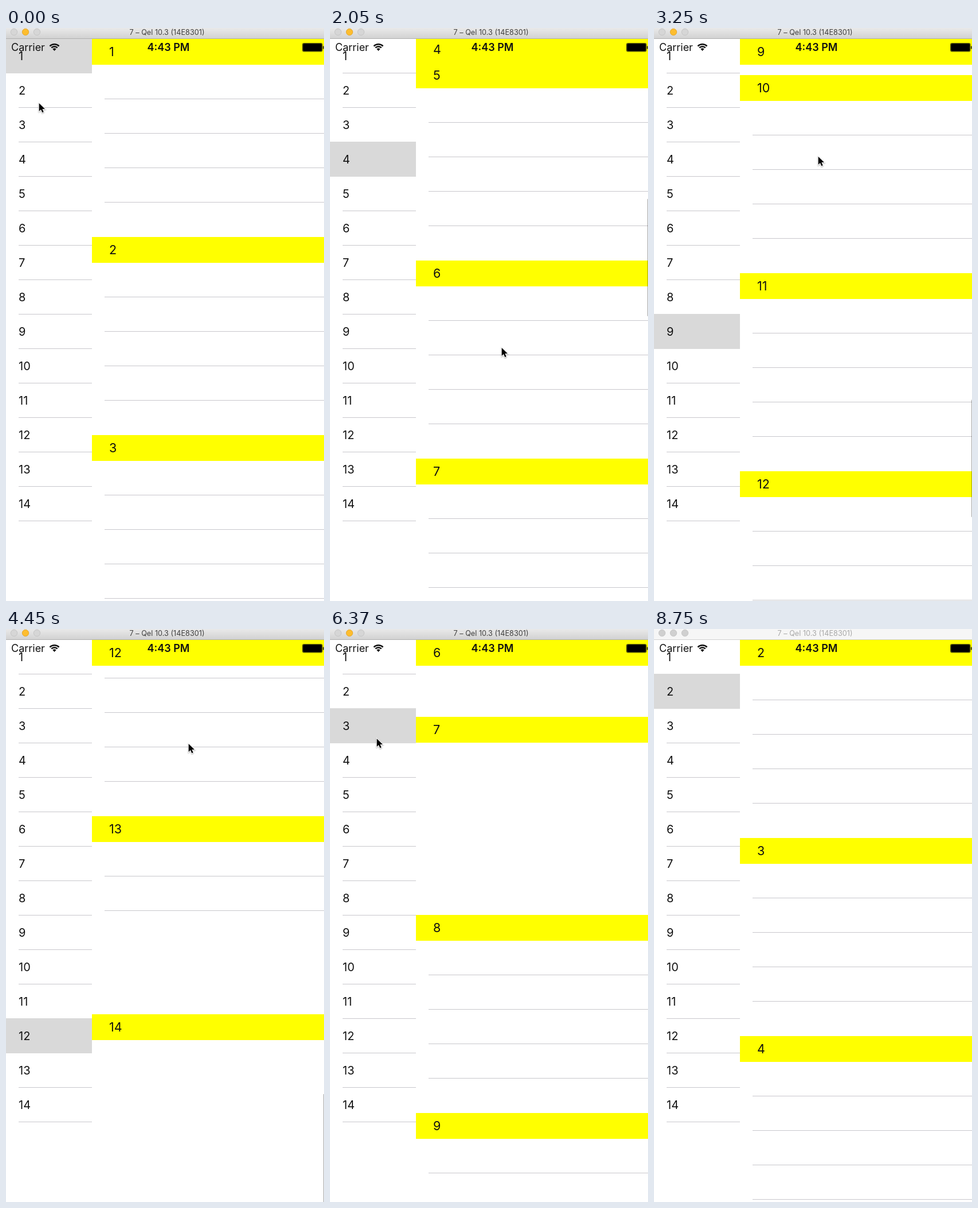
Write an HTML page with a canvas that moves like this. It is 555x998 px and loops after 8850 ms.

```html
<!DOCTYPE html>
<html lang="en">
<head>
<meta charset="utf-8">
<title>Linked lists</title>
<style>
  html, body { margin: 0; width: 100%; height: 100%; overflow: hidden; background: #fff; }
  canvas { display: block; width: 555px; height: 998px; }
</style>
</head>
<body>
<canvas id="stage" width="555" height="998"></canvas>
<script>
const ctx = document.getElementById('stage').getContext('2d');
const W = 555, H = 998, LOOP = 8850;
const TOP = 19, SPLIT = 150, ROW = 60, HEAD = 45, SECTION = HEAD + 5 * ROW, COUNT = 14;
const LINE = '#c8c7cc', INK = '#111';

// The screen refreshes every 150 ms, with a few shorter ticks.
const shortTicks = [420, 1160, 4450, 5190, 5480, 7870];
const ticks = [0, 270];
while (ticks.at(-1) < 8010) {
  const last = ticks.at(-1);
  ticks.push(last + (shortTicks.includes(last) ? 140 : 150));
}
ticks.push(8750);

const tap = (start, end, section) => ({ start, end, y: section * SECTION, section });
const move = (start, end, y, x = 0) => ({ start, end, x, y });

// Taps in the menu jump to a section; the other moves are flicks of the list.
const scrolls = [
  tap(-1, 0, 0),
  tap(180, 420, 1),
  move(1000, 2050, 1339),
  move(2050, 3250, 3042),
  move(4200, 4450, 3833),
  move(4450, 4590, 3851),
  move(4590, 5190, 2605),
  move(5190, 5900, 2390),
  tap(6270, 6565, 2),
  tap(7350, 7700, 1)
];

const cursorMoves = [
  move(-1, 0, 130, 57),
  move(560, 1000, 760, 300),
  move(1000, 1450, 250, 303),
  move(1600, 2050, 556, 299),
  move(2050, 2500, 223, 286),
  move(3400, 4150, 600, 315),
  move(4200, 4450, 199, 318),
  move(4590, 5190, 771, 272),
  move(5500, 6200, 190, 81),
  move(6800, 7300, 102, 80)
];

const smooth = p => p * p * (3 - 2 * p);
const latest = (moves, t) => moves.findLastIndex(m => m.start <= t);

function position(moves, t, axis) {
  const i = latest(moves, t), to = moves[i];
  const from = moves[Math.max(0, i - 1)];
  const p = smooth(Math.min(1, (t - to.start) / (to.end - to.start)));
  return Math.round(from[axis] + (to[axis] - from[axis]) * p);
}

const scrollAt = t => position(scrolls, t, 'y');
const sectionAt = t => Math.floor(scrollAt(t) / SECTION);
const selectedAt = t => scrolls[latest(scrolls, t)].section ?? sectionAt(t);

function rect(color, x, y, w, h) {
  ctx.fillStyle = color;
  ctx.fillRect(x, y, w, h);
}

function roundRect(color, x, y, w, h, r) {
  ctx.fillStyle = color;
  ctx.beginPath();
  ctx.roundRect(x, y, w, h, r);
  ctx.fill();
}

function text(str, x, y, size, color = INK, weight = 400, align = 'left') {
  ctx.font = `${weight} ${size}px Inter, Roboto, sans-serif`;
  ctx.textAlign = align;
  ctx.fillStyle = color;
  ctx.fillText(str, x, y);
}

function drawMenu(t, before) {
  const selected = selectedAt(t), previous = selectedAt(before);
  // Scrolling back, the old highlight fades before the new one appears.
  const fading = scrolls[latest(scrolls, t)].section === undefined && selected < previous;
  const shaded = fading ? previous : selected;
  rect('#fff', 0, 0, SPLIT, H);
  rect(fading ? '#ddd' : '#d9d9d9', 0, TOP + shaded * ROW - 1, SPLIT, ROW + 1);
  for (let i = 0; i < COUNT; i++) {
    const y = TOP + i * ROW;
    if (i !== selected && i !== selected - 1) rect(LINE, 22, y + ROW - 1, SPLIT - 22, 1);
    text(i + 1, 22, y + 36.6, 20);
  }
}

function drawContent(t, before) {
  const offset = scrollAt(t), shift = offset - scrollAt(before);
  const fast = Math.abs(shift) > 350;
  const current = sectionAt(t);
  const place = i => TOP + i * SECTION - offset;

  // Rows that have just rushed into view get their separators one tick later.
  for (let i = current; i < COUNT; i++) {
    for (let row = 1; row < 5; row++) {
      const bottom = place(i) + HEAD + row * ROW, oldBottom = bottom + shift;
      const isNew = fast && (oldBottom < TOP + HEAD || oldBottom - ROW > H);
      if (!isNew) rect(LINE, SPLIT + 22, bottom - 1, W, 1);
    }
  }
  for (let i = current; i < COUNT; i++) {
    const y = i === current ? Math.min(TOP, place(i + 1) - HEAD) : place(i);
    rect('#ff0', SPLIT, y, W - SPLIT, HEAD);
    text(i + 1, 180, y + 30, 21.5);
  }
  if (scrolls[latest(scrolls, t)].section === undefined) {
    rect('rgba(0,0,0,.35)', W - 1, 22.8 + offset * 0.2054, 1, 204);
  }
}

function drawStatus() {
  text('Carrier', 9, 40.3, 18);
  text('4:43 PM', 283.5, 40.3, 18, INK, 600, 'center');

  ctx.strokeStyle = ctx.fillStyle = INK;
  ctx.lineWidth = 2.4;
  const from = -Math.PI * 0.75, to = -Math.PI * 0.25;
  for (const radius of [11.4, 7.4]) {
    ctx.beginPath();
    ctx.arc(84.5, 39.6, radius, from, to);
    ctx.stroke();
  }
  ctx.beginPath();
  ctx.moveTo(84.5, 40);
  ctx.arc(84.5, 39.6, 4.4, from, to);
  ctx.fill();

  roundRect('#55550a', 517, 26, 35.5, 15.5, 3);
  roundRect('#000', 518.5, 27.5, 32.5, 12.5, 2);
  rect('#222206', 553, 31.5, 1.5, 5);
}

function drawTitleBar(active) {
  const shade = ctx.createLinearGradient(0, 0, 0, 18);
  shade.addColorStop(0, active ? '#e9e9e9' : '#f6f6f6');
  shade.addColorStop(1, active ? '#d2d2d2' : '#f6f6f6');
  rect(shade, 0, 0, W, 18);
  rect(active ? '#b0b0b0' : '#d0d0d0', 0, 18, W, 1);
  [14, 34, 54].forEach((x, i) => {
    const lit = active && i === 1;
    ctx.beginPath();
    ctx.arc(x, 7, 5.7, 0, Math.PI * 2);
    ctx.fillStyle = lit ? '#fdbd2e' : active ? '#d6d6d6' : '#d0d0d0';
    ctx.strokeStyle = lit ? '#dfa023' : '#bfbfbf';
    ctx.lineWidth = 0.8;
    ctx.fill();
    ctx.stroke();
  });
  text('7 – Qel 10.3 (14E8301)', 281, 12, 12.7, active ? '#404040' : '#a8a8a8', 400, 'center');
}

function drawCursor(t) {
  ctx.save();
  ctx.translate(position(cursorMoves, t, 'x'), position(cursorMoves, t, 'y'));
  const arrow = new Path2D('M.7 1V15L4 12 6.3 17.3 8.7 16.2 6.4 11H11Z');
  ctx.shadowColor = 'rgba(0,0,0,.35)';
  ctx.shadowBlur = 2;
  ctx.shadowOffsetY = 1;
  ctx.strokeStyle = '#fff';
  ctx.lineWidth = 2;
  ctx.stroke(arrow);
  ctx.shadowColor = 'transparent';
  ctx.fillStyle = '#000';
  ctx.fill(arrow);
  ctx.restore();
}

function render(time) {
  const tick = ticks.findLastIndex(at => at <= time);
  const t = ticks[tick], before = ticks[Math.max(0, tick - 1)];
  rect('#fff', 0, 0, W, H);
  drawContent(t, before);
  drawMenu(t, before);
  drawStatus();
  drawTitleBar(t < 8750);
  if (t < 8010) drawCursor(t);
}

const start = performance.now();
function loop() {
  render((performance.now() - start) % LOOP);
  requestAnimationFrame(loop);
}
loop();
</script>
</body>
</html>
```
